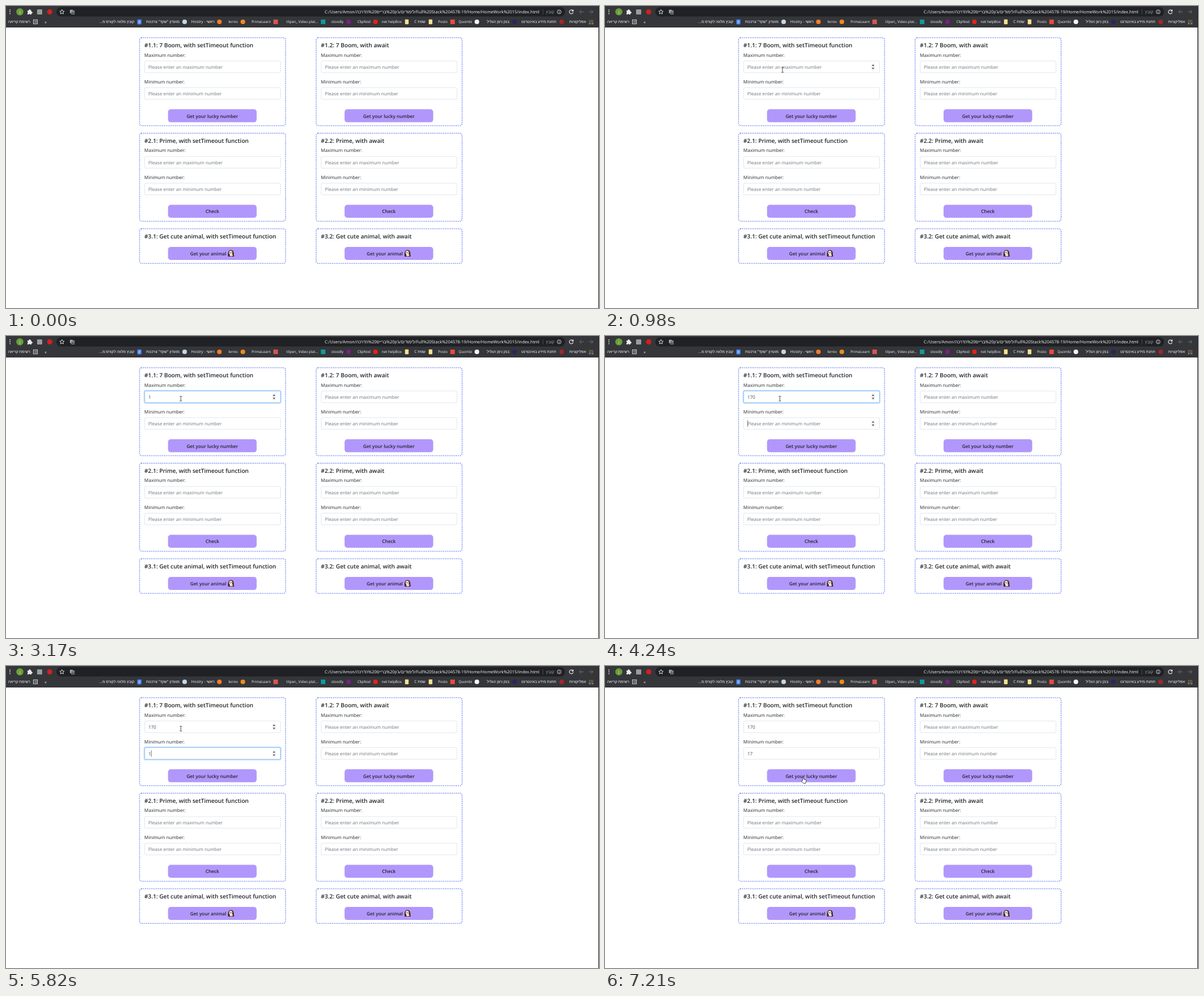
An HTML page for the animation above (8 s loop, 1049 px wide and 534 px high).

```html
<!DOCTYPE html>
<html lang="en">
<head>
<meta charset="utf-8">
<title>Number forms</title>
<style>
  html, body { margin: 0; width: 100%; height: 100%; overflow: hidden; background: #fff; }
  svg { display: block; width: 1049px; height: 534px; }
  text {
    font-family: 'Open Sans', 'Noto Sans', 'Liberation Sans', sans-serif;
    font-size: 8.15px; fill: #212529;
    text-rendering: geometricPrecision; white-space: pre;
  }
  .title { font-size: 10.19px; font-weight: 600; }
  .action { font-size: 8.25px; font-weight: 600; }
  .hint { fill: #6c757d; }
  .value { fill: #495057; }
  .url { font-size: 7.5px; fill: #f1f3f4; }
  .mark { font-size: 6.35px; fill: #f1f3f4; }
  .hebrew { font-size: 6.8px; }
  .card { fill: none; stroke: #6680f5; stroke-width: 1.75; stroke-linecap: round; stroke-dasharray: 0 3.3; }
  .field { fill: #fff; stroke: #ced4da; stroke-width: .6; }
  .glow { fill: none; stroke: #007bff; stroke-opacity: .25; stroke-width: 1.8; }
  .edge { fill: none; stroke: #80bdff; stroke-width: .7; }
  .button { fill: #b197fc; }
  .line { fill: none; stroke: #e8eaed; stroke-width: .9; }
</style>
</head>
<body>
<svg id="stage" viewBox="0 0 1049 534"></svg>
<script>
const LOOP = 8000;
const COLUMN = 312.3, ROW = 168.9;
const stage = document.getElementById('stage');

function el(tag, attrs, parent = stage) {
  const node = document.createElementNS('http://www.w3.org/2000/svg', tag);
  for (const key in attrs) node.setAttribute(key, attrs[key]);
  return parent.appendChild(node);
}
const group = (parent = stage) => el('g', {}, parent);
const rect = (x, y, width, height, attrs, parent) =>
  el('rect', { x, y, width, height, ...attrs }, parent);
const disc = (cx, cy, r, fill, parent) => el('circle', { cx, cy, r, fill }, parent);
const path = (d, attrs, parent) => el('path', { d, ...attrs }, parent);
function text(x, y, string, type, anchor = 'start', parent = stage) {
  const node = el('text', { x, y, class: type, 'text-anchor': anchor }, parent);
  node.textContent = string;
  return node;
}

// Browser bars
function drawToolbar() {
  rect(0, 0, 1049, 38, { fill: '#35363a' });
  rect(89, 2, 900, 16.6, { rx: 8.3, fill: '#202124' });
  for (const y of [7, 10.3, 13.6]) disc(7, y, .95, '#e8eaed');
  disc(24.5, 10.3, 6.3, '#689f38');
  text(24.5, 12.5, 'J', 'mark', 'middle');
  path('M38 8h2.6a1.5 1.5 0 1 1 2.8 0H45v2.4a1.4 1.4 0 1 1 0 2.5V15h-2.4a1.4 1.4 0 0 0-2.6 0H38v-2.4a1.4 1.4 0 0 0 0-2.5z',
    { fill: '#e8eaed' });
  rect(55, 6, 9, 9, { rx: 1, fill: '#9a9b9d' });
  disc(77.3, 10.3, 4.6, '#d32020');
  path('M99 6.2l1.2 2.7 2.9.3-2.2 1.9.7 2.9-2.6-1.5-2.6 1.5.7-2.9-2.2-1.9 2.9-.3z', { class: 'line' });
  rect(113, 6.6, 5.2, 6, { fill: '#9aa0a6' });
  rect(116, 8.4, 4.8, 5.8, { fill: '#202124', stroke: '#d5d7da', 'stroke-width': .7 });
  path('M117.2 10.2h2.6M118.5 10.2v2.6', { class: 'line' });

  text(943.7, 13.2,
    "C:/Users/Amon/לימודים/ג'ון%20ברייס%20הדרכה/Full%20Stack%204578-19/Home/HomeWork%2015/index.html",
    'url', 'end');
  rect(949.6, 6, .6, 9, { fill: '#6b6c70' });
  text(970, 13.2, 'קובץ', 'url', 'end').style.fill = '#9aa0a6';
  el('circle', { cx: 978.5, cy: 10.3, r: 3.4, class: 'line' });
  path('M978.5 8.4v.8M978.5 10v2.2', { class: 'line' });
  path('M1002.6 8.2A3.4 3.4 0 1 0 1003.3 11M1003.4 6.4v2.7h-2.7', { class: 'line', style: 'stroke-width:1.2' });
  const dim = { class: 'line', style: 'stroke:#77787c' };
  path('M1022 10.3h-7.4M1018 6.9l-3.4 3.4 3.4 3.4', dim);
  path('M1031 10.3h7.4M1035 6.9l3.4 3.4-3.4 3.4', dim);
}

function drawBookmarks() {
  const dots = ['#ea4335', '#fbbc04', '#34a853', '#4285f4'];
  for (let i = 0; i < 9; i++)
    rect(1031.4 + i % 3 * 2.8, 24.8 + Math.floor(i / 3) * 2.8, 1.8, 1.8, { fill: dots[(i * 2 + (i > 4)) % 4] });

  // icon centre, icon colour, icon shape, right end of label, label
  const marks = [
    [0, '', '', 1026, 'אפליקציות'],
    [983, '#a3262b', 'disc', 973.5, 'תחנת מידע באינטרנט'],
    [899.5, '#26285f', 'disc', 890.5, 'בנק ניצן הגליל'],
    [833, '#f1f3f4', 'disc', 824.5, 'Quombi'],
    [790, '#e54a3c', 'square', 781, 'Posto'],
    [751, '#fbe08a', 'note', 742, 'C שפת'],
    [709, '#fbe08a', 'note', 700, 'net helpBox'],
    [653.5, '#e62117', 'disc', 645, 'ClipNod'],
    [606, '#7d1d86', 'disc', 597, 'stoodly'],
    [561, '#0e9a9c', 'square', 552, 'tilpen_ Video plat...'],
    [477, '#d9534f', 'square', 468.5, 'PrimaLearn'],
    [419, '#ef8a1d', 'disc', 410, 'lernix'],
    [377.5, '#f57c2a', 'disc', 369, 'Hostry - ראשי'],
    [316, '#c3d7e8', 'disc', 307, 'מועדון "שקד" צרכנות'],
    [236, '#4285f4', 'page', 227, '...קובץ מלווה לקורס מ'],
    [0, '', '', 43, 'רשימת קריאה']
  ];
  for (const [x, fill, shape, end, label] of marks) {
    if (shape === 'disc') disc(x, 28, 4.1, fill);
    if (shape === 'square') rect(x - 4, 24, 8, 8, { fill });
    if (shape === 'note') rect(x - 3.2, 23.8, 6.4, 8.4, { rx: .8, fill });
    if (shape === 'page') {
      rect(x - 3.7, 23.8, 7.4, 8.6, { rx: .8, fill });
      path(`M${x - 2} 26.6h4m-4 1.7h4m-4 1.7h3`, { class: 'line', style: 'stroke-width:.7' });
    }
    text(end, 30.4, label, /[א-ת]/.test(label) ? 'mark hebrew' : 'mark', 'end');
  }
  text(70, 31, '«', 'url', 'middle');
  rect(48.6, 24.4, 7, 7.2, { class: 'line' });
  path('M50 26.6h1m.8 0h2.4M50 28h1m.8 0h2.4M50 29.4h1m.8 0h2.4', { class: 'line', style: 'stroke-width:.7' });
}

// Page
const fieldBox = y => [245.3, y, 240.2, 20.7];
const buttonBox = y => [286.6, y, 156.8, 23];

function drawField(y, label, word, parent) {
  text(244.8, y - 7.6, label, '', 'start', parent);
  rect(...fieldBox(y), { rx: 2.2, class: 'field' }, parent);
  return text(251.8, y + 13.9, `Please enter an ${word} number`, 'hint', 'start', parent);
}

function drawAnimal(x, y, parent) {
  const g = el('g', { transform: `translate(${x} ${y})` }, parent);
  path('M.3 11.5C-.4 5 .6 0 5 0s5.6 3.4 5.4 7.2L11 11.5z', { fill: '#43231a' }, g);
  el('ellipse', { cx: 4.9, cy: 4.5, rx: 3, ry: 3.2, fill: '#fbf3ee' }, g);
  el('ellipse', { cx: 5.8, cy: 9, rx: 2.9, ry: 1.9, fill: '#efe0d8' }, g);
  for (const eye of [3.5, 6.2]) disc(eye, 4, .75, '#3a2018', g);
  disc(4.9, 5.7, .6, '#3a2018', g);
}

function drawCard(column, row, title, action) {
  const g = el('g', { transform: `translate(${column * COLUMN} ${row * ROW})` });
  const short = row === 2;
  rect(236.3, 56, 258.2, short ? 61.3 : 155.6, { rx: 4, class: 'card' }, g);
  text(244.8, 72.9, title, 'title', 'start', g);
  const top = short ? 88.3 : 182.6;
  rect(...buttonBox(top), { rx: 5, class: 'button' }, g);
  if (short) {
    text(325.8, top + 14.9, action, 'action', 'start', g);
    drawAnimal(392.6, top + 5.4, g);
    return [];
  }
  text(365, top + 14.9, action, 'action', 'middle', g);
  return [
    drawField(97.2, 'Maximum number:', 'maximum', g),
    drawField(144.3, 'Minimum number:', 'minimum', g)
  ];
}

drawToolbar();
drawBookmarks();
const tasks = [['7 Boom', 'Get your lucky number'], ['Prime', 'Check'], ['Get cute animal', 'Get your animal']];
const ways = ['setTimeout function', 'await'];
const cards = tasks.flatMap(([name, action], row) => ways.map((way, column) =>
  drawCard(column, row, `#${row + 1}.${column + 1}: ${name}, with ${way}`, action)));
rect(1048, 0, 1, 534, { fill: '#1c1c1e' });

// Live parts of the first form
const fields = cards[0].map((label, i) => {
  const y = [97.2, 144.3][i];
  const ring = group();
  const [x, , w, h] = fieldBox(y);
  rect(x - .9, y - .9, w + 1.8, h + 1.8, { rx: 3, class: 'glow' }, ring);
  rect(x, y, w, h, { rx: 2.2, class: 'edge' }, ring);
  const spinner = group();
  rect(471.2, y + 4.8, 6, 11.4, { fill: '#f0f0f0' }, spinner);
  path(`M472.1 ${y + 8.9}l2.1-2.8 2.1 2.8zM472.1 ${y + 12.1}l2.1 2.8 2.1-2.8z`, { fill: '#505050' }, spinner);
  return { y, label, ring, spinner, hint: label.textContent };
});
const caret = rect(0, 0, .7, 11.2, { fill: '#333' });

const ink = { fill: '#fff', stroke: '#111', 'stroke-width': .75, 'stroke-linejoin': 'round' };
const pointers = {
  arrow: path('M0 0V9L2 7.2 3.4 10.4 4.8 9.8 3.4 6.7H6.2Z', ink),
  beam: path('M-2-4.3h1.5L0-3.8.5-4.3H2M0-3.8V3.8M-2 4.3h1.5L0 3.8.5 4.3H2', { ...ink, fill: 'none' }),
  hand: path('M-.9 6.5V.9a.9.9 0 0 1 1.8 0V4l3.4.8a1 1 0 0 1 .9 1V8.4l-.9 3H.3L-2.7 7.8c-.6-1 .6-1.8 1.1-1z', ink)
};

// Steps: time in ms, then the state from that time on
const mouse = [
  [70, 886, 501], [140, 650, 322], [210, 464, 157],
  [440, 449, 207], [520, 430, 203], [590, 406, 199], [670, 381, 189], [750, 358, 171],
  [820, 340, 152], [900, 325, 126], [980, 314, 113], [1060, 311.5, 111.7], [1130, 310.5, 111],
  [1210, 310, 110.8], [1990, 309.3, 110.8],
  [6600, 311, 115], [6680, 317, 127], [6750, 326, 146], [6830, 337, 167], [6900, 346, 184],
  [6980, 350, 191.8], [7060, 350.4, 194.5], [7130, 350.5, 196]
];
const typed = [
  [[2620, '1'], [3530, '17'], [4010, '170']],
  [[4720, '1'], [5890, '17']]
];
const glow = [
  [[1300, .5], [1380, 1], [4310, 0]],
  [[4310, 1], [7060, .6], [7130, .2], [7210, 0]]
];
const focus = [[1210, 0], [4240, 1], [7060, -1]];
const blink = [[1210, 1], [1760, 0], [2300, 1], [3170, 0], [3530, 1], [5270, 0], [5820, 1], [6370, 0], [6900, 1]];

function at(steps, time, initial) {
  let state = initial;
  for (const [start, ...rest] of steps) if (start <= time) state = rest.length > 1 ? rest : rest[0];
  return state;
}
const inside = (point, x, y, w, h) => Boolean(point) &&
  point[0] >= x && point[0] <= x + w && point[1] >= y && point[1] <= y + h;
const show = (node, on) => node.setAttribute('opacity', Number(on));

function render(time) {
  const point = at(mouse, time, null);
  const active = at(focus, time, -1);
  let kind = inside(point, ...buttonBox(182.6)) ? 'hand' : 'arrow';

  fields.forEach((field, i) => {
    const value = at(typed[i], time, '');
    const hover = inside(point, ...fieldBox(field.y));
    if (hover) kind = 'beam';
    field.label.textContent = value || field.hint;
    field.label.setAttribute('class', value ? 'value' : 'hint');
    show(field.ring, at(glow[i], time, 0));
    show(field.spinner, hover || active === i);
    if (active === i) {
      caret.setAttribute('x', 252.1 + value.length * 4.65);
      caret.setAttribute('y', field.y + 4.9);
    }
  });

  show(caret, active >= 0 && at(blink, time, 0));
  for (const name in pointers) {
    show(pointers[name], point && name === kind);
    if (point) pointers[name].setAttribute('transform', `translate(${point[0]} ${point[1]})`);
  }
}

const begin = performance.now();
function tick() {
  render((performance.now() - begin) % LOOP);
  requestAnimationFrame(tick);
}
render(0);
requestAnimationFrame(tick);
</script>
</body>
</html>
```
